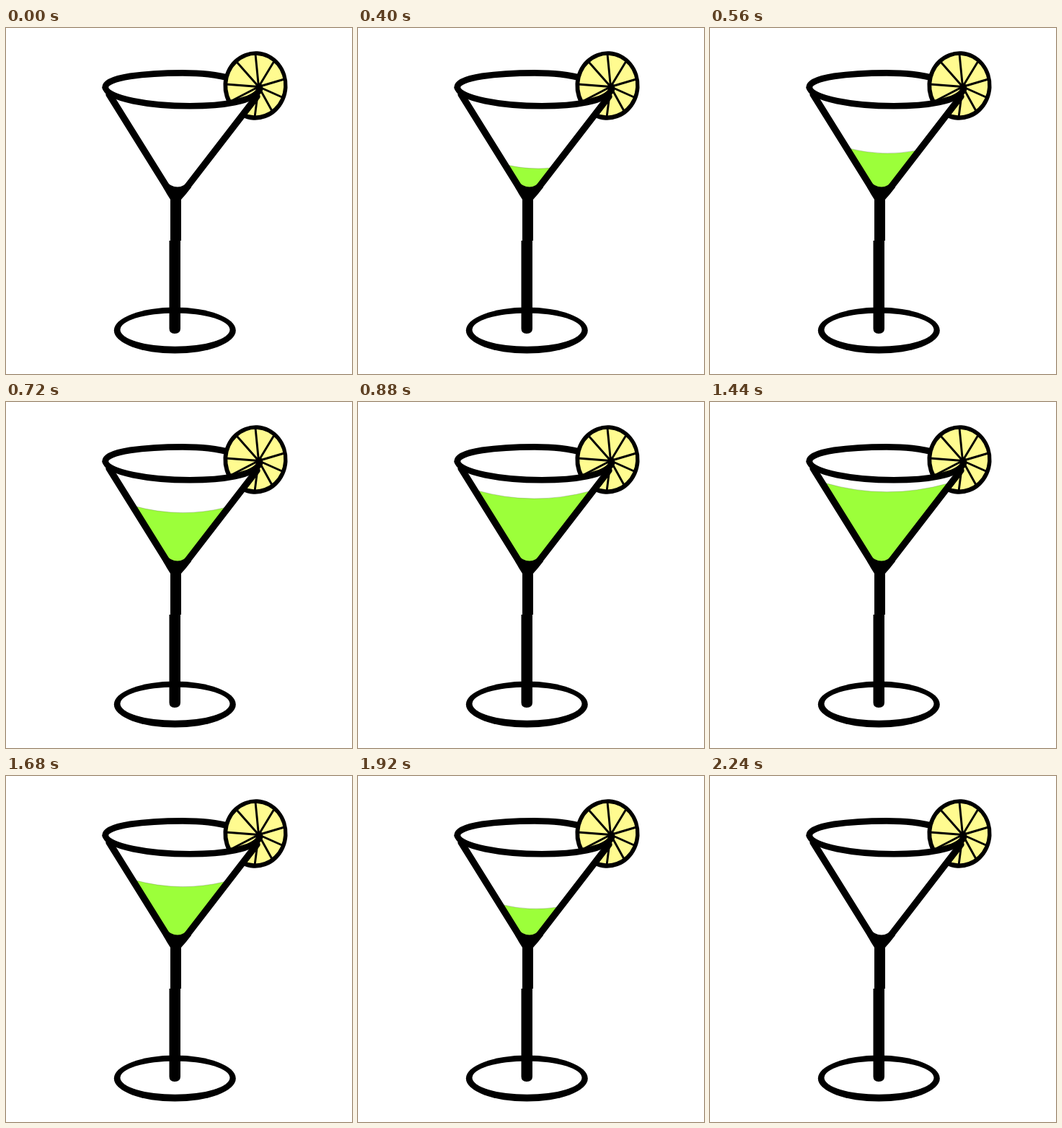
An HTML page with a canvas for the animation above (2400 ms loop, 480 px wide and 480 px high).

```html
<!DOCTYPE html>
<html lang="en">
<head>
<meta charset="utf-8">
<title>Filling cocktail glass</title>
<style>
html, body { margin: 0; width: 100%; height: 100%; overflow: hidden; background: #fff; }
canvas { display: block; width: 480px; height: 480px; }
</style>
</head>
<body>
<canvas id="stage" width="480" height="480"></canvas>
<script>
const ctx = document.getElementById('stage').getContext('2d');
const LOOP = 2400, STEP = 80, FULL = 11;
const INK = '#000', LIQUID = '#9cff3a', SURFACE = '#bbff7c', LEMON = '#fffb90';

const clamp = (v, lo, hi) => Math.max(lo, Math.min(hi, v));

// The glass fills and drains in equal steps, with a rest at each end.
function levelAt(ms) {
  const up = Math.floor((ms - 240) / STEP) + 1;
  const down = Math.floor((ms - 1440) / STEP) + 1;
  return clamp(up, 0, FULL) - clamp(down, 0, FULL);
}

function fill(path, color) {
  ctx.fillStyle = color;
  ctx.fill(new Path2D(path));
}

function stroke(path, width, color = INK) {
  ctx.strokeStyle = color;
  ctx.lineWidth = width;
  ctx.stroke(new Path2D(path));
}

function ellipse(x, y, rx, ry, color, tilt = 0) {
  ctx.beginPath();
  ctx.ellipse(x, y, rx, ry, tilt, 0, Math.PI * 2);
  ctx.fillStyle = color;
  ctx.fill();
}

// Inner walls of the bowl
const wallLeft = y => 209 + (y - 190) * 0.627;
const wallRight = y => 266 - (y - 194) * 0.765;

const FRONT_RIM = 'M137.8 82.5 C140 98 200 108.3 255 108.3 C300 108.3 345 102 352 85';
const BACK_RIM = 'M137.8 82.5 C137 68 195 62.3 245 62.3 C270 62.3 290 64 320 72';

function drawLemon() {
  const tilt = 0.06;
  ellipse(346, 80, 44.6, 47.8, INK, tilt);
  ellipse(346.2, 79.6, 39, 41.8, LEMON, tilt);
  const tips = [[346, 36], [372, 46], [386, 71], [383, 96], [369, 115],
                [345, 124], [313, 101], [305, 78], [320, 47]];
  for (const [x, y] of tips) stroke(`M350.5 81.5 L${x} ${y}`, 2.9);
}

function drawLiquid(level) {
  const left = level === FULL ? 100 : 226 - 12.2 * level + 0.08 * level * level;
  const right = left + (level === FULL ? 6 : Math.max(1, 5.5 - level * 0.5));
  const sag = Math.max(0.5, 2.5 + (level - 3) * 1.4);
  const x1 = wallLeft(left) - 2, x2 = wallRight(right) + 2;
  const top = `M${x1} ${left} Q${(x1 + x2) / 2} ${(left + right) / 2 + sag * 2} ${x2} ${right}`;
  fill(`${top} L250 222 L224 222 Z`, LIQUID);
  stroke(top, 0.7, 'rgba(70,90,60,.4)');
}

function drawGlass() {
  stroke(FRONT_RIM, 8.6);
  stroke('M143 92 L224 222', 9.4);
  stroke('M348 95 L250 222', 9.4);
  // Bowl tip and stem
  fill('M218 221 L222 212 Q228 220.5 238 220.5 Q247 220.5 253 212 L257 221 ' +
       'L250 230 L243 238 V295 H242 V417 Q242 424 234 424 Q226.5 424 226.5 417 ' +
       'V295 H228 V238 L223 230 Z', INK);
}

function drawBase() {
  ellipse(234.3, 419.6, 84.5, 32, INK);
  ellipse(234.5, 418.6, 76, 23.2, '#fff');
}

function draw(ms) {
  const level = levelAt(ms);
  ctx.fillStyle = '#fff';
  ctx.fillRect(0, 0, 480, 480);
  ctx.lineCap = ctx.lineJoin = 'round';

  drawBase();
  if (level === FULL) {
    fill('M144 87 C165 73 225 64 306 73 L310 105 Q250 111 190 103 L150 94 Z', SURFACE);
  }
  stroke(BACK_RIM, 8.8);
  drawLemon();

  // The bowl hides the lemon below the rim.
  fill('M143 92 C160 104 200 108 255 108 C300 108 335 104 348 95 L250 222 L224 222 Z', '#fff');
  if (level > 0) drawLiquid(level);
  drawGlass();
  ellipse(351, 82.5, 5.2, 6, INK);
}

const start = performance.now();
function tick() {
  draw((performance.now() - start) % LOOP);
  requestAnimationFrame(tick);
}
tick();
</script>
</body>
</html>
```
